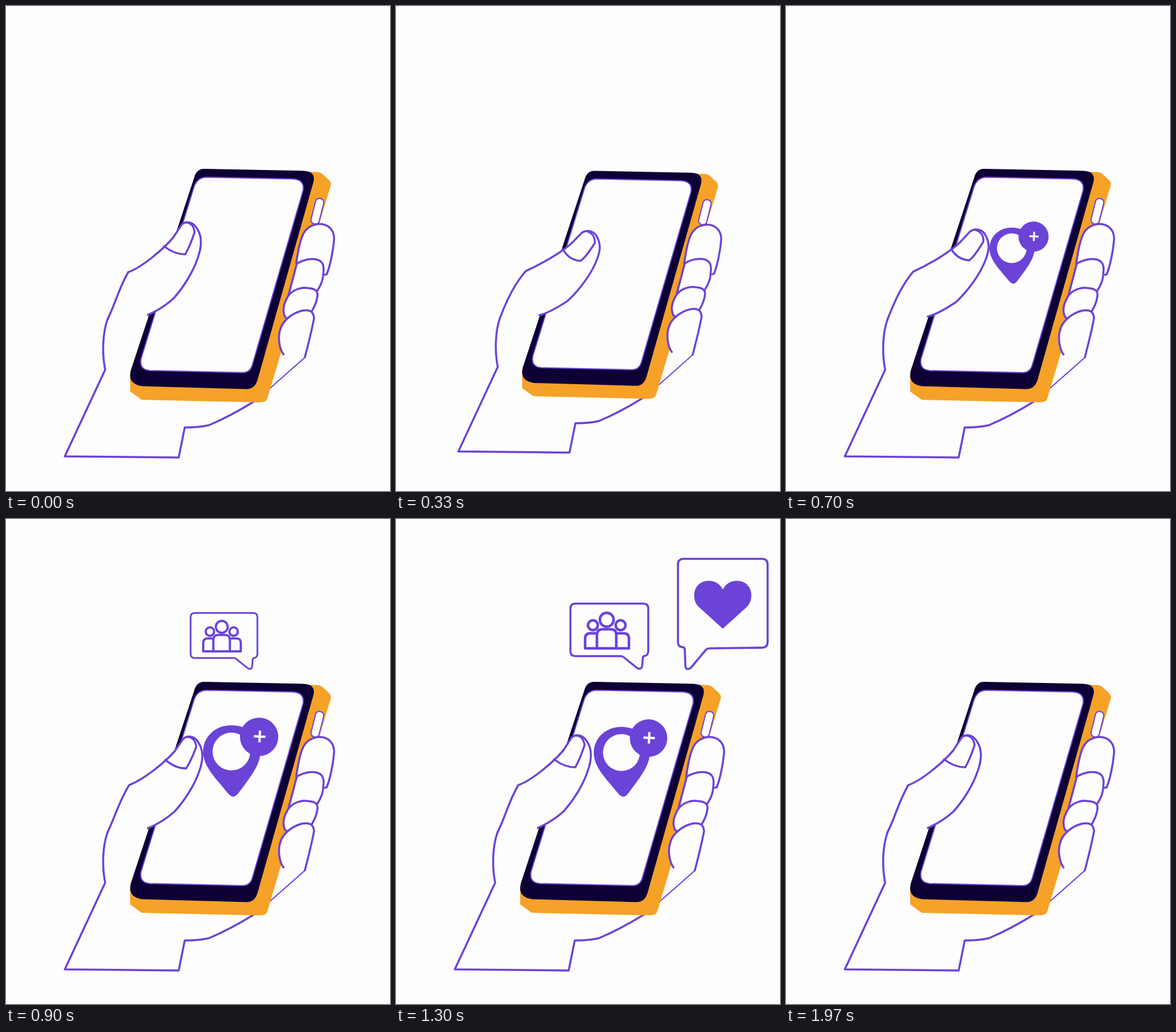
Animation of 666x840 px, one loop 2000 ms. Source, as an HTML page:

```html
<!DOCTYPE html>
<html lang="en">
<head>
<meta charset="utf-8">
<title>Phone in hand</title>
<style>
  html, body { margin: 0; width: 100%; height: 100%; overflow: hidden; background: #fdfdfd; }
  svg { display: block; width: 666px; height: 840px; }
  .line { fill: #fdfdfd; stroke: #6b43d7; stroke-width: 3.5; stroke-linecap: round; stroke-linejoin: round; }
  .open { fill: none; }
  .thin { stroke-width: 2; }
  .bold { stroke-width: 4.5; }
  .ink { fill: #6b43d7; }
</style>
</head>
<body>
<svg viewBox="0 0 666 840">
  <g id="hand">
    <path class="line" d="M186 523L176 543C168 565 166 600 172 630L102 780L299.500 782L310 730Q335 730 352 726Q390 710 430 685"/>
    <path class="line open thin" d="M458 662L518 609"/>

    <g transform="translate(-.7 -.5)">
      <path fill="#f6a128" d="M216 635V668L236 682.500L440 687Q452 687 454 680L564 311Q565 306 561 302L549 291Q545 288 540 288L500 287Z"/>
      <path fill="#0d0035" d="M344 282.500L517 286Q538 287 534 305L437 648Q432 664.500 417 664L237 659Q216 656 216 640L217 632L327 298Q331 282.500 344 282.500Z"/>
      <path class="line thin" d="M349 297L498 300Q519 301 516 320L428 622Q424 636 410 635.500L250 632Q231 630 235 611L327 313Q333 297 349 297Z"/>
      <rect class="line thin" x="533.500" y="333.500" width="14.500" height="45" rx="6.500" transform="rotate(14 541 356)"/>

      <path class="line" d="M504 447C507 425 511 405 517 394C525 380 540 377 550 378.500C563 381 571 392 569.500 407C568 425 563 450 557 465L554 466"/>
      <path class="line" d="M491 500L505 447C515 440 530 437 541 440C550 443 553 450 551 463C551 473 547 484 541 493"/>
      <path class="line" d="M488 541Q484 540 483 534C480 524 484 513 490 503C497 493 511 487 524 489C536 490 541 493 541 501C540 512 536 521 531 529"/>
      <path class="line" d="M482 604C475 595 472 575 476 562C480 545 498 532 515 528C528 526 534 530 535 541C531 562 524 590 519 609"/>
    </g>
  </g>

  <g id="pin">
    <path class="ink" d="M394 481Q390 481 384 474C365 450 343 430 343 405C343 380 363 360 391 360C420 360 440 380 440 407C440 428 420 452 403 475Q398 481 394 481Z"/>
    <circle cx="391" cy="404.500" r="32" fill="#fdfdfd"/>
    <circle class="ink" cx="438" cy="379.500" r="32.500"/>
    <path d="M429 378.500L449 379.500M439.500 369L438.500 389" stroke="#fdfdfd" stroke-width="4"/>
  </g>

  <g id="thumb">
    <path class="line" id="skin"/>
    <path class="line open" id="nail"/>
  </g>

  <g id="group">
    <path class="line" d="M311 146.500H429Q437.500 146.500 437.500 155V229Q437 236 432 237Q428 237 428 241L427 254Q426 262 418 258L395 239.500Q393 237.500 390 237.500H311Q302.500 237.500 302.500 229V155Q302.500 146.500 311 146.500Z"/>
    <g class="line open bold">
      <circle cx="341.500" cy="184" r="8.500"/>
      <circle cx="389.500" cy="184" r="8.500"/>
      <circle cx="365.500" cy="174.500" r="12"/>
      <path d="M348 198H337Q328 198 328 207V224H404V207Q404 198 395 198H382M348.500 224V201Q348.500 191 358 191H373Q382 191 382 201V224"/>
    </g>
  </g>

  <g id="heart">
    <path class="line" d="M499 74.500H631Q640.500 74.500 640.500 84V214Q640.500 224 631 224L543 225Q539 225 537 227L511 258Q503 263 502 255L501 228Q501 223 497 223Q489.500 222 489.500 215V84Q489.500 74.500 499 74.500Z"/>
    <path class="ink" d="M565 192L524 155C511 142 515 112 541 111.500Q557 111.500 565 126Q573 111.500 589 111.500C615 112 619 142 606 155Z"/>
  </g>
</svg>
<script>
const LOOP = 2000;
const $ = id => document.getElementById(id);
const smooth = u => u * u * (3 - 2 * u);
const linear = u => u;

// Value at time t in a table of [time, value] steps.
function track(steps, t, ease) {
  if (t <= steps[0][0]) return steps[0][1];
  for (let i = 1; i < steps.length; i++) {
    const [t0, a] = steps[i - 1], [t1, b] = steps[i];
    if (t <= t1) return a + (b - a) * ease((t - t0) / (t1 - t0));
  }
  return steps[steps.length - 1][1];
}

// Blend two paths that share the same commands.
function blend(from, to, k) {
  const goal = to.match(/[\d.]+/g);
  let i = 0;
  return from.replace(/[\d.]+/g, n => (+n + (goal[i++] - n) * k).toFixed(2));
}

const skin = {
  rest: 'M176 543C190 515 195 490 212 461C237 452 274 420 290 401L305 378C314 371 325 375 331 385C340 398 340 415 333 435C325 460 308 487 291 506C277 519 262 528 246 535',
  tap: 'M176 543C186 517 200 484 221 460C250 447 287 425 304 408L320 391C330 384 343 388 348 400C355 414 352 427 346 442C337 465 315 495 295 513C280 523 262 534 246 538'
};
const nail = {
  rest: 'M274 416C284 424 296 430 311 430C315 423 323 404 327 392C326 381 320 375 311 375',
  tap: 'M287 421C294 433 304 440 318 441C325 437 335 422 343 409C344 399 339 391 328 388'
};

const press = [[0, 1], [330, 0.976], [400, 0.976], [550, 1.01], [680, 1]];
const reach = [[40, 0], [320, 1.08], [620, 1.08], [1000, 0]];
const pop = [[0, 0], [70, 0.49], [130, 0.8], [200, 1.055], [420, 1]];

const icons = [
  { el: $('pin'), x: 394, y: 481, start: 570, out: [1710, 1950] },
  { el: $('group'), x: 427, y: 261, start: 755, out: [1570, 1780] },
  { el: $('heart'), x: 505, y: 261, start: 1000, out: [1630, 1850] }
];

const zoom = (el, x, y, s) =>
  el.setAttribute('transform', `translate(${x} ${y}) scale(${s}) translate(${-x} ${-y})`);

function draw(t) {
  const s = track(press, t, smooth), k = track(reach, t, smooth);
  for (const id of ['hand', 'thumb']) zoom($(id), 360, 425, s);
  $('skin').setAttribute('d', blend(skin.rest, skin.tap, k));
  $('nail').setAttribute('d', blend(nail.rest, nail.tap, k));
  for (const { el, x, y, start, out } of icons) {
    const size = track(pop, t - start, linear) *
      track([[out[0], 1], [out[1], 0]], t, smooth);
    el.style.display = size > 0 ? '' : 'none';
    zoom(el, x, y, size);
  }
}

const begin = performance.now();
function tick() {
  draw((performance.now() - begin) % LOOP);
  requestAnimationFrame(tick);
}
tick();
</script>
</body>
</html>
```
